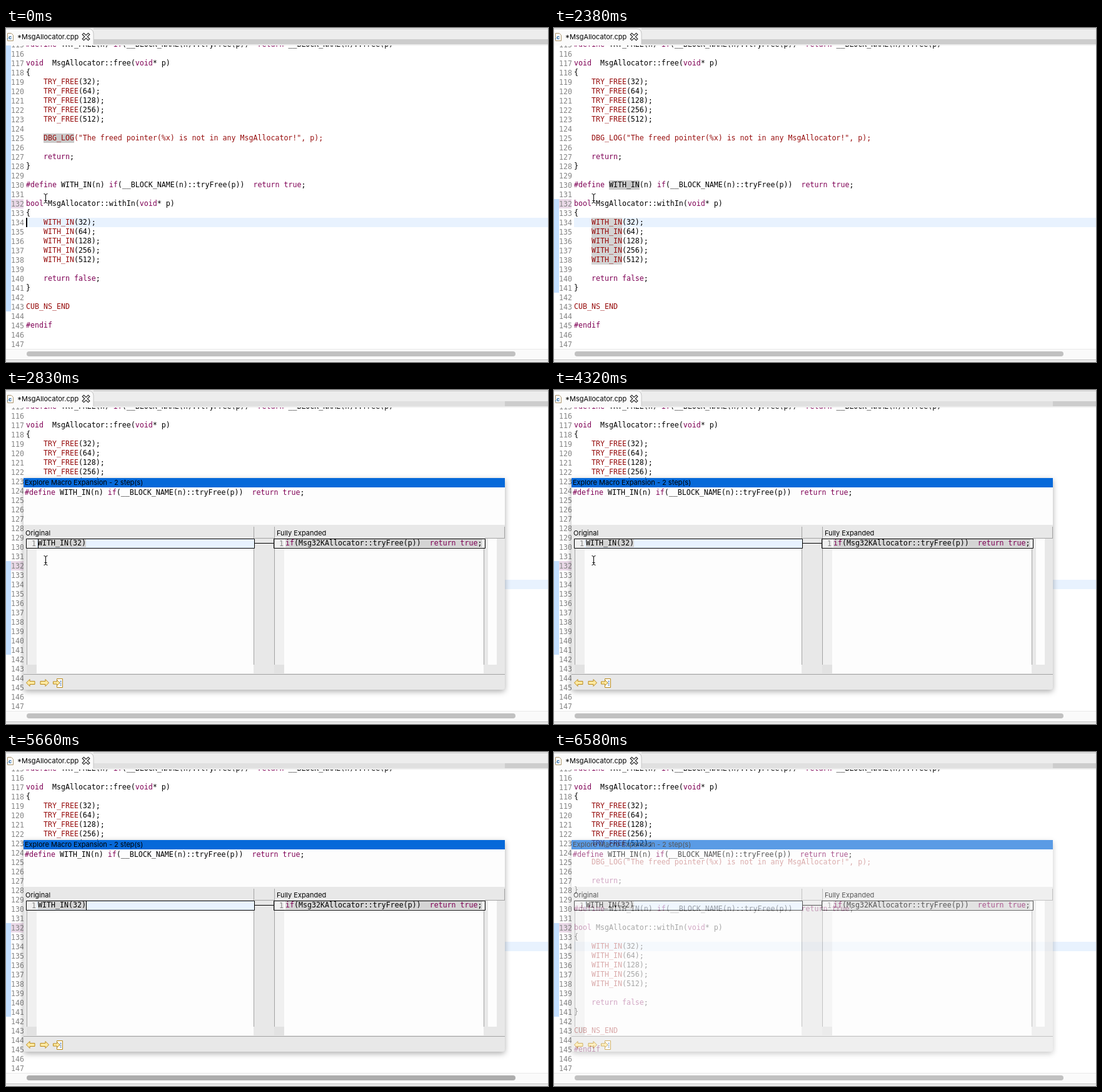
Animation of 867 by 535 pixels, one loop 6.68 s. Source, as an HTML page:

```html
<!DOCTYPE html>
<html lang="en">
<head>
<meta charset="utf-8">
<title>Macro expansion</title>
<style>
  html, body { margin: 0; width: 100%; height: 100%; overflow: hidden; background: #fff; }
  svg { display: block; }
  text { white-space: pre; font: 11px Inter, sans-serif; }
  .code { font: 11.627px "DejaVu Sans Mono", monospace; }
  .num { fill: #858585; }
  .key { fill: #7f0055; }
  .mac { fill: #970d0d; }
  .icon { fill: #ffe9a0; stroke: #b98a1c; }
  #frame { filter: drop-shadow(0 3px 5px rgba(0, 0, 0, .32)); }
</style>
</head>
<body>
<svg width="867" height="535" viewBox="0 0 867 535">
  <defs>
    <pattern id="check" width="2" height="2" patternUnits="userSpaceOnUse">
      <path d="M0 0h2v2h-2z" fill="#d3e7ff"/>
      <path d="M0 0h1v1h-1zM1 1h1v1h-1z" fill="#b4d7ff"/>
    </pattern>
    <path id="arrow" d="M39 469l-6 -6v3.500z"/>
  </defs>
  <rect width="867" height="535" fill="#fff"/>

  <rect id="diff" width="8" fill="url(#check)"/>
  <path d="M8 274h20v15h-20z" fill="#ead9e8"/>
  <path d="M32 304h835v15h-835z" fill="#e8f2fe"/>
  <path id="logMark" d="M60 169h49v15h-49z" fill="#c9c9c9"/>
  <g id="withMarks">
    <path d="M88 244h49v15h-49z" fill="#c9c9c9"/>
    <path d="M60 304h49v75h-49z" fill="#d4d4d4"/>
  </g>
  <g id="lines"></g>
  <rect id="caret" y="304" width="2" height="15"/>

  <!-- tab bar -->
  <path d="M0 0h867v28h-867z" fill="#ededed"/>
  <path d="M140 18h727v8h-727z" fill="#cdcdcd"/>
  <path id="dimBar" d="M140 18h658v8h-658z" fill="#e0e0e0"/>
  <path d="M0 1.500h132q8 0 8 8V28H0z" fill="#fbfbfb"/>
  <path d="M0 1.500h132q8 0 8 8V26M140 1.500h727" fill="none" stroke="#c4c4c4"/>
  <path d="M2.500 8.500h6l3 3v9h-9z" fill="#fff" stroke="#a8936a"/>
  <text x="1" y="18" style="font-size:9px;font-weight:700" fill="#2367a5">.c</text>
  <text x="18" y="18">*MsgAllocator.cpp</text>
  <path d="M124.500 10.500l7 7m0 -7l-7 7" stroke="#222" stroke-width="4.400" stroke-linecap="square"/>
  <path d="M124.500 10.500l7 7m0 -7l-7 7" stroke="#fff" stroke-width="2" stroke-linecap="square"/>

  <!-- horizontal scroll bar -->
  <path d="M0 514h867v16h-867z" fill="#fafafa"/>
  <path d="M0 514.500h867" stroke="#e9e9e9"/>
  <path d="M0 531h867v4h-867z" fill="#ececec"/>
  <path d="M0 531.500h867" stroke="#bdbdbd"/>
  <rect x="33" y="518" width="782" height="8" rx="4" fill="#c1c1c1"/>
  <rect id="hover" y="518" height="8" rx="4"/>

  <!-- expansion popup -->
  <g id="popup">
    <path id="frame" d="M28 141h770v335q0 4 -4 4h-762q-4 0 -4 -4z" fill="#e8e8e8"/>
    <g id="content">
      <path d="M28 141h770v15h-770z" fill="#0669d9"/>
      <text x="30" y="152">Explore Macro Expansion - 2 step(s)</text>
      <path d="M28 156h770v60h-770zM49 238h347v216h-347zM445 238h319v216h-319zM771 238h14v202h-14z" fill="#fdfdfd"/>
      <path d="M33 238h16v202h-16zM429 238h16v202h-16z" fill="#f0f0f0"/>
      <path d="M33 440h16v14h-16zM429 440h16v14h-16z" fill="#e2e2e2"/>
      <path d="M33.500 254V440M396.500 219V440M429.500 219V440M764.500 254V440M797.500 219V237M398 237.500H429M766 237.500H798M28 455.500H798" stroke="#a3a3a3"/>
      <text x="31" y="233">Original</text>
      <text x="433" y="233">Fully Expanded</text>
      <path d="M49 238h348v15h-348z" fill="#e8f2fe"/>
      <path d="M51 239h77v13h-77zM447 239h315v13h-315z" fill="#d4d4d4"/>
      <path d="M32.500 238.500h365v15h-365zM428.500 238.500h338v15h-338zM398 245.500h30" fill="none" stroke="#000"/>
      <g id="popupCode"></g>
      <rect id="popupCaret" y="238" width="1" height="15"/>
      <g class="icon">
        <path d="M32.500 469l5.500 -5.500v3h8v5h-8v3z"/>
        <path d="M68.500 469l-5.500 -5.500v3h-8v5h8v3z"/>
        <path d="M81.500 462.500h9v14h-9z" fill="#fff"/>
        <path d="M86 466.500h3M86 469.500h3M86 472.500h3" stroke="#3b6fb5"/>
        <path d="M86 469l-4.500 -4.500v2.500h-6v4h6v2.500z"/>
      </g>
    </g>
    <g id="blank">
      <path d="M28 141h770v339h-770z"/>
      <path d="M28 141h4v4h-4zM794 141h4v4h-4zM28 476h4v4h-4zM794 476h4v4h-4z" fill="#fff"/>
    </g>
  </g>

  <g id="beam" fill="none">
    <path id="beamHalo" d="M-3 -7.500q3 0 3 2.500v10q0 2.500 -3 2.500M3 -7.500q-3 0 -3 2.500M0 5q0 2.500 3 2.500M-2 3.500h4" stroke-width="2.200"/>
    <path id="beamLine" d="M-3 -7.500q3 0 3 2.500v10q0 2.500 -3 2.500M3 -7.500q-3 0 -3 2.500M0 5q0 2.500 3 2.500M-2 3.500h4"/>
  </g>
  <path id="pointer" d="M0 0v14.500l3.300 -3 2.400 5.500 2.500 -1 -2.400 -5.400h4.300z" stroke="#fff" stroke-width=".8"/>
</svg>
<script>
const LOOP = 6680, FIRST = 115, LINE = 15, TOP = 19;
const $ = id => document.getElementById(id);

const listing = `#define TRY_FREE(n) if(__BLOCK_NAME(n)::tryFree(p))  return __BLOCK_NAME(n)::free(p)

void  MsgAllocator::free(void* p)
{
    TRY_FREE(32);
    TRY_FREE(64);
    TRY_FREE(128);
    TRY_FREE(256);
    TRY_FREE(512);

    DBG_LOG("The freed pointer(%x) is not in any MsgAllocator!", p);

    return;
}

#define WITH_IN(n) if(__BLOCK_NAME(n)::tryFree(p))  return true;

bool MsgAllocator::withIn(void* p)
{
    WITH_IN(32);
    WITH_IN(64);
    WITH_IN(128);
    WITH_IN(256);
    WITH_IN(512);

    return false;
}

CUB_NS_END

#endif

`.split("\n");

const span = (type, s) => `<tspan class="${type}">${s}</tspan>`;
const paint = s => s.replace(
  /#define|#endif|\b(?:void|bool|if|return|true|false)\b|^ +(?:TRY_FREE|WITH_IN)|^ +DBG_LOG.*|^CUB_NS_END/g,
  m => span(/[A-Z]/.test(m) ? "mac" : "key", m));
const code = (x, y, s, type = "") => `<text class="code ${type}" x="${x}" y="${y}">${s}</text>`;

$("lines").innerHTML = listing.map((s, i) => {
  const base = TOP + i * LINE + 11;
  return code(8, base + 1, FIRST + i, "num") + code(32, base, paint(s));
}).join("");

$("popupCode").innerHTML =
  code(30, 168, paint(listing[15])) +
  code(41, 250, 1, "num") + code(51, 249, "WITH_IN(32)") +
  code(437, 250, 1, "num") +
  code(447, 249, paint("if(Msg32KAllocator::tryFree(p))  return true;"));

// [start, value] steps; 0 means hidden
const caretSteps = [[0, 32], [150, 0], [590, 46], [740, 0], [890, 60], [1040, 67],
  [1190, 74], [1330, 0], [1930, 81], [2380, 0]];
const popupCaretSteps = [[0, 0], [2830, 51], [3280, 0], [3720, 51], [4320, 0],
  [4620, 128], [4920, 0], [5510, 128], [5960, 0]];
const beamSteps = [[0, [63.5, 273]], [2680, [62.5, 273]], [2830, [63.5, 273]],
  [5220, [82.5, 279]], [5370, 0]];
const pointerSteps = [[0, 0], [5370, [445, 517.5]], [5510, [448, 527]], [5660, 0]];
const hoverSteps = [[0, 0], [5370, .08], [5510, .16], [5660, .1], [5810, .05], [5960, 0]];

const at = (steps, t) => steps.findLast(([start]) => start <= t)[1];
const set = (id, attrs) => { for (const k in attrs) $(id).setAttribute(k, attrs[k]); };
const show = (id, on) => { $(id).style.display = on ? "" : "none"; };
const place = (id, pos) => {
  show(id, pos);
  if (pos) set(id, { transform: `translate(${pos})` });
};
const putCaret = (id, x) => {
  show(id, x);
  set(id, { x });
};

function draw(t) {
  const blank = t >= 2680 && t < 2830;
  set("diff", t < 450 ? { y: 28, height: 426 } : { y: 274, height: 150 });
  show("logMark", t < 1930);
  show("withMarks", t >= 1930 && t < 2680);
  putCaret("caret", at(caretSteps, t));

  show("dimBar", t >= 2830);
  show("popup", t >= 2680);
  set("popup", { opacity: t < 6580 ? 1 : .66 });
  show("content", !blank);
  show("blank", blank);
  putCaret("popupCaret", at(popupCaretSteps, t));

  const partial = t < 5510;
  set("hover", { x: partial ? 79 : 33, width: partial ? 378 : 782, opacity: at(hoverSteps, t) });
  place("beam", at(beamSteps, t));
  set("beamHalo", { stroke: blank ? "#000" : "#fff" });
  set("beamLine", { stroke: blank ? "#aaa" : "#000" });
  place("pointer", at(pointerSteps, t));
}

const start = performance.now();
function tick() {
  draw((performance.now() - start) % LOOP);
  requestAnimationFrame(tick);
}
tick();
</script>
</body>
</html>
```
